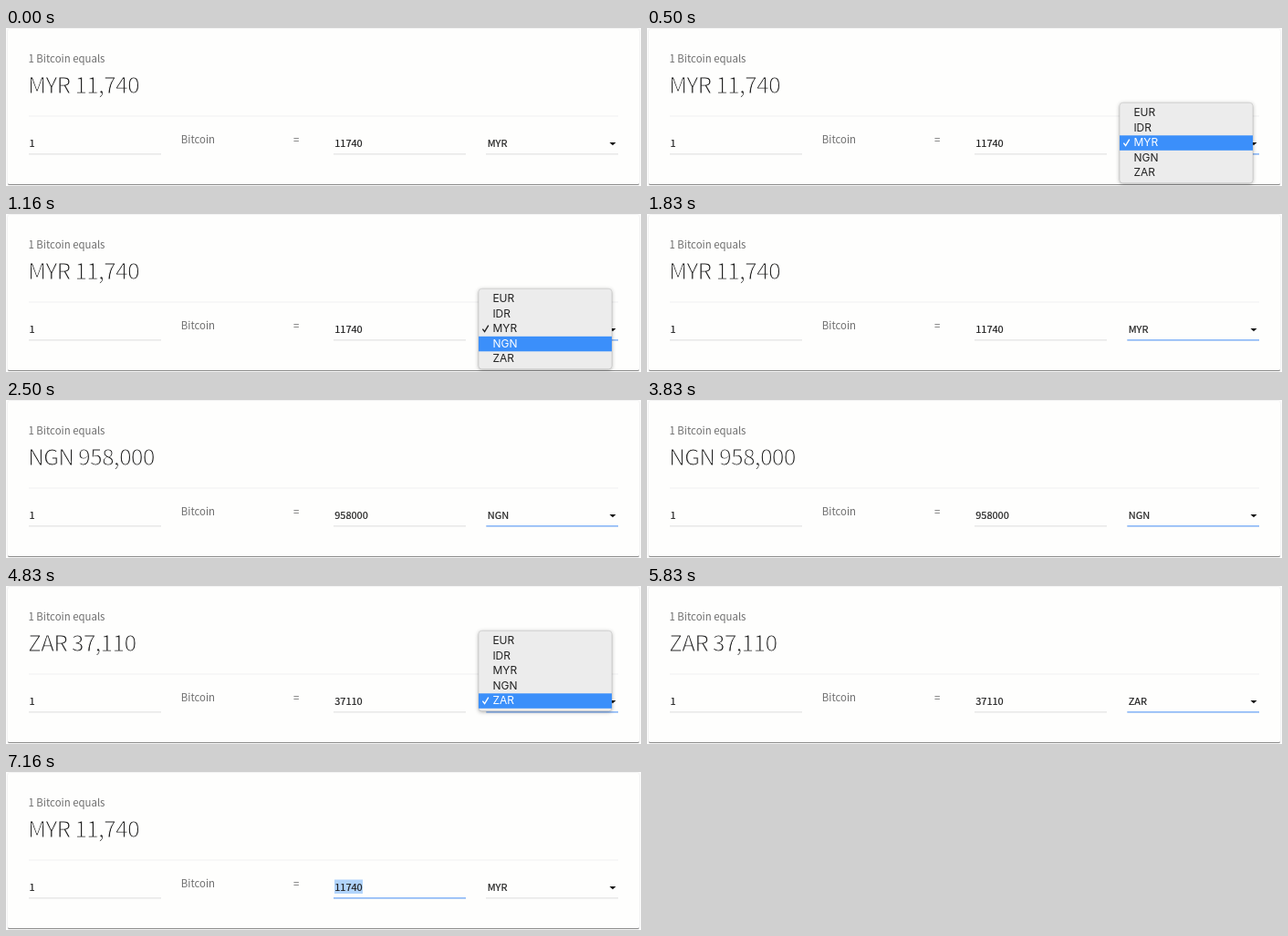
Write an HTML page that moves like this. It is 696 px wide and 174 px high and loops after 8000 ms.

```html
<!DOCTYPE html>
<html lang="en">
<head>
<meta charset="utf-8">
<title>Currency converter</title>
<style>
  html, body { margin: 0; width: 100%; height: 100%; overflow: hidden; background: #fff; }
  svg { display: block; width: 696px; height: 174px; }
  text { font: 400 11.4px "Noto Sans CJK SC", "Noto Sans CJK JP", "Noto Sans", sans-serif; fill: #6e6e6e; }
  .card { fill: #fefefd; filter: drop-shadow(0 1px .6px rgba(0,0,0,.42)) drop-shadow(0 .3px 1px rgba(0,0,0,.14)); }
  /* a card-coloured outline thins the strokes to a light weight */
  .head { font-size: 24.8px; letter-spacing: -.85px; fill: #212121; stroke: #fefefd; stroke-width: 1px; }
  .field { font-size: 11px; fill: #212121; stroke: #212121; stroke-width: .2px; }
  .rule { fill: #dcdcdc; }
  .focus { fill: #86b6fb; }
  .panel { fill: #ececec; stroke: rgba(0,0,0,.2); stroke-width: .5; filter: drop-shadow(0 1.5px 2px rgba(0,0,0,.32)); }
  .row rect { fill: none; }
  .row text { font: 400 12px Inter, "Liberation Sans", sans-serif; fill: #222; }
  .row path { fill: none; stroke: #222; stroke-width: 1.4; visibility: hidden; }
  .checked path { visibility: inherit; }
  .hot rect { fill: #3b8ffa; }
  .hot text { fill: #fff; }
  .hot path { stroke: #fff; }
</style>
</head>
<body>
<svg viewBox="0 0 696 174">
  <rect class="card" x="2" y="1" width="692" height="171" rx="1.5"/>
  <text x="24.5" y="37.6">1 Bitcoin equals</text>
  <text id="head" class="head" x="24" y="72"></text>
  <rect x="25" y="96.5" width="646" height="1" fill="#f2f2f2"/>

  <rect class="rule" x="25" y="138.4" width="145" height="1"/>
  <rect class="rule" x="359" y="138.4" width="145" height="1"/>
  <rect class="rule" x="526" y="138.4" width="145" height="1"/>
  <text class="field" x="25.5" y="130.8">1</text>
  <text x="191.8" y="126.6">Bitcoin</text>
  <text x="315" y="126.6">=</text>

  <g id="inputFocus">
    <rect x="360" y="118.5" width="31" height="15.5" fill="#b1d4fb"/>
    <rect class="focus" x="359" y="138.1" width="145" height="1.5"/>
  </g>
  <text id="value" class="field" x="360.2" y="130.8"></text>

  <rect id="selectFocus" class="focus" x="526.4" y="138.1" width="144.6" height="1.5"/>
  <text id="code" class="field" x="527.7" y="130.8"></text>
  <path d="M661.5 126h7l-3.5 3.3z" fill="#111"/>

  <g id="menu">
    <rect class="panel" x="518" y="-3" width="146" height="88.5" rx="3.5"/>
  </g>
</svg>
<script>
  const LOOP = 8000, ROW = 16.5, ROW_TOP = 118.3;
  const codes = ["EUR", "IDR", "MYR", "NGN", "ZAR"];
  const rates = { MYR: 11740, NGN: 958000, ZAR: 37110 };
  const el = id => document.getElementById(id);

  const rows = codes.map((code, i) => {
    const g = document.createElementNS("http://www.w3.org/2000/svg", "g");
    g.setAttribute("transform", `translate(518 ${i * ROW})`);
    g.innerHTML = `<rect width="146" height="${ROW}"/>
      <path d="M4.4 8.4l2.2 2.9l4.2 -7"/>
      <text x="15.4" y="11.8">${code}</text>`;
    el("menu").append(g);
    return g;
  });

  // Each step lists only what changes; hot is the highlighted menu row.
  const steps = [
    { at: 0, head: "MYR", code: "MYR", value: "MYR", open: false, hot: "", focus: "" },
    { at: 500, open: true, hot: "MYR", focus: "select" },
    { at: 1160, hot: "NGN" },
    { at: 1500, hot: "" },
    { at: 1830, open: false },
    { at: 2160, code: "NGN", value: "" },
    { at: 2500, head: "NGN", value: "NGN" },
    { at: 2830, open: true, hot: "NGN" },
    { at: 3160, hot: "ZAR" },
    { at: 3830, open: false },
    { at: 4160, head: "ZAR", code: "ZAR", value: "ZAR" },
    { at: 4830, open: true, hot: "ZAR" },
    { at: 5160, hot: "MYR" },
    { at: 5830, open: false },
    { at: 6160, code: "MYR", value: "" },
    { at: 6500, head: "MYR", value: "MYR" },
    { at: 7160, focus: "input" }
  ];

  const show = (id, on) => el(id).setAttribute("visibility", on ? "visible" : "hidden");

  function render(s) {
    el("head").textContent = `${s.head} ${rates[s.head].toLocaleString("en-US")}`;
    el("value").textContent = rates[s.value] || "";
    el("code").textContent = s.code;
    show("inputFocus", s.focus === "input");
    show("selectFocus", s.focus === "select");
    show("menu", s.open);
    // The chosen row always lies over the select field.
    const top = ROW_TOP - codes.indexOf(s.code) * ROW;
    el("menu").setAttribute("transform", `translate(0 ${top})`);
    rows.forEach((row, i) => {
      const checked = codes[i] === s.code ? " checked" : "";
      const hot = codes[i] === s.hot ? " hot" : "";
      row.setAttribute("class", "row" + checked + hot);
    });
  }

  let shown = -1;
  const start = performance.now();
  function tick() {
    const t = Math.max(0, performance.now() - start) % LOOP;
    const past = steps.filter(s => s.at <= t);
    if (past.length !== shown) {
      shown = past.length;
      render(Object.assign({}, ...past));
    }
    requestAnimationFrame(tick);
  }
  tick();
</script>
</body>
</html>
```
